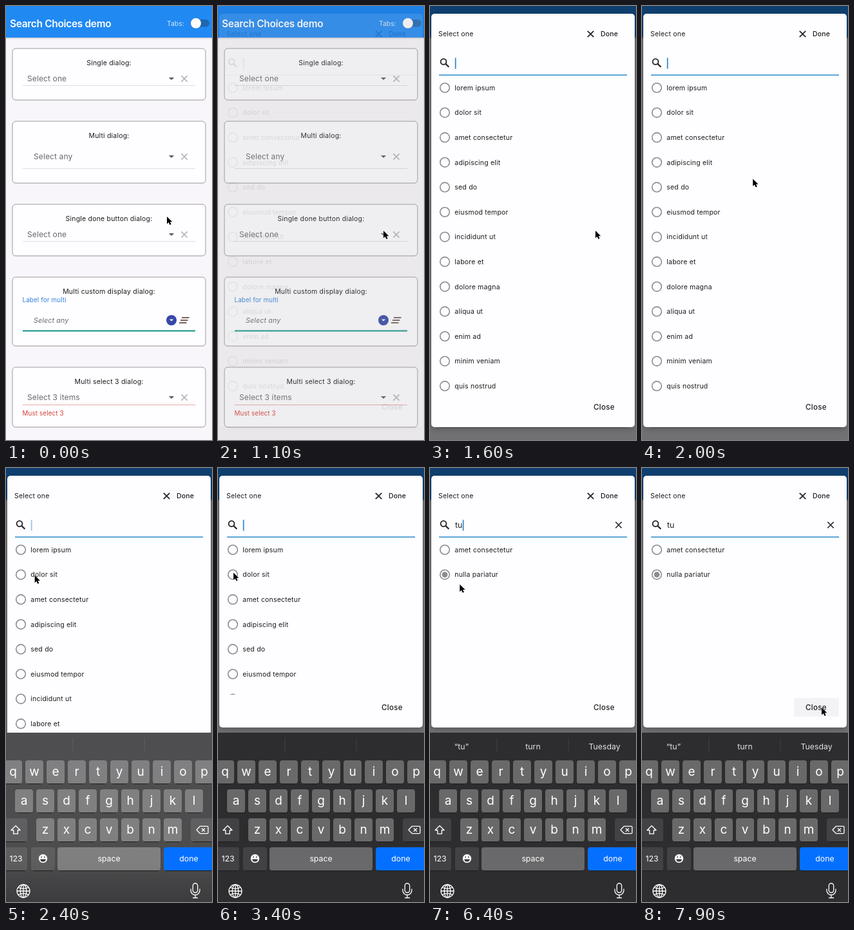
Write an HTML page that moves like this. It is 320 px wide and 674 px high and loops after 8 s.

```html
<!DOCTYPE html>
<html lang="en">
<head>
<meta charset="utf-8">
<title>Search Choices demo</title>
<style>
html, body { margin: 0; width: 100%; height: 100%; overflow: hidden; background: #f8f6fa; }
svg { display: block; width: 320px; height: 674px; font-family: Inter, Roboto, "Liberation Sans", sans-serif; }
text { white-space: pre; }
.body { font-size: 10.5px; letter-spacing: .2px; fill: #1c1c1c; }
.hint { font-size: 12px; letter-spacing: .12px; fill: #69686b; }
.small { font-size: 9.8px; letter-spacing: .15px; }
.mid { text-anchor: middle; }
.key { font-size: 12.3px; fill: #fff; text-anchor: middle; }
.letter { font-size: 19px; fill: #fff; text-anchor: middle; }
.pick { font-size: 12.3px; fill: #e2e2e3; text-anchor: middle; }
</style>
</head>
<body>
<svg id="stage" viewBox="0 0 320 674" xmlns="http://www.w3.org/2000/svg"></svg>
<script>
const LOOP = 8000, STEP = 100, ROWS = 13, PITCH = 38.6;
const OPEN = 1090, READY = 1600, TYPE_T = 4600, TYPE_U = 4900, PICK = 5500;
const STALL = [2100, 2500], BLINK = 1060;
const WORDS = ['lorem ipsum', 'dolor sit', 'amet consectetur', 'adipiscing elit', 'sed do',
  'eiusmod tempor', 'incididunt ut', 'labore et', 'dolore magna', 'aliqua ut', 'enim ad',
  'minim veniam', 'quis nostrud', 'exercitation ullamco', 'laboris nisi', 'ut aliquip', 'ex ea',
  'commodo consequat', 'duis aute', 'irure dolor', 'in reprehenderit', 'in voluptate',
  'velit esse', 'cillum dolore', 'eu fugiat', 'nulla pariatur'];
const PICKED = 'nulla pariatur';

// pointer moves: start, end across, end down, x, y
const MOVES = [[0, 700, 700, 257, 349], [1600, 2580, 2480, 24, 162.5], [6200, 7300, 7300, 279, 372]];
const HOME = [250, 327];

const clamp = v => Math.max(0, Math.min(1, v));
const ramp = (t, a, b) => clamp((t - a) / (b - a));
const smooth = p => p * p * (3 - 2 * p);
const easeOut = p => 1 - (1 - p) ** 3;
const mix = (a, b, p) => a + (b - a) * p;
const range = n => [...Array(n).keys()];

const text = (x, y, s, cls = 'body', more = '') => `<text x="${x}" y="${y}" class="${cls}" ${more}>${s}</text>`;
const rect = (x, y, w, h, fill, r = 0, more = '') =>
  `<rect x="${x}" y="${y}" width="${w}" height="${h}" rx="${r}" fill="${fill}" ${more}/>`;
const line = (x1, y1, x2, y2, color, w = 1) =>
  `<path d="M${x1} ${y1}L${x2} ${y2}" stroke="${color}" stroke-width="${w}" fill="none"/>`;
const cross = (x, y, r, color, w, more = '') =>
  `<path d="M${x - r} ${y - r}l${2 * r} ${2 * r}m0 ${-2 * r}l${-2 * r} ${2 * r}" stroke="${color}" stroke-width="${w}" ${more}/>`;
const caretDown = (x, y, r, color) => `<path d="M${x - r} ${y - r / 2}h${2 * r}l${-r} ${r}z" fill="${color}"/>`;

function card(top, bottom, title, titleY) {
  return rect(10, top + 1, 300, bottom - top, '#000', 5, 'opacity=".06"') +
    rect(10, top, 300, bottom - top, '#fefdff', 5, 'stroke="#9c9b9d"') +
    text(160, titleY + 3.7, title, 'body mid');
}

function field(x, y, hint, lineY, color = '#dddce0') {
  return text(x, y + 4.2, hint, 'hint') + caretDown(257, y, 4.2, '#5c5b5e') +
    cross(277, y, 4.6, '#b5b4b7', 1.6) + line(26, lineY, 294, lineY, color);
}

function page() {
  return rect(0, 0, 320, 674, '#f8f6fa') +
    rect(0, 49, 320, 3, 'url(#barShade)') + rect(0, 0, 320, 49, '#2089f2') +
    text(6, 32.6, 'Search Choices demo', '', 'fill="#fff" font-size="15.4" font-weight="600" letter-spacing="-.28"') +
    text(250, 30.8, 'Tabs:', 'body', 'style="fill:#d6e9fc;font-size:10.3px;letter-spacing:.1px"') +
    rect(288, 21, 28, 11.5, '#1d66b0', 5.7) +
    '<circle cx="295" cy="27.6" r="8" fill="#000" opacity=".15"/><circle cx="295" cy="26.8" r="8" fill="#fcfcfd"/>' +
    card(66, 146, 'Single dialog:', 88) + field(33, 113, 'Select one', 123.5) +
    card(179, 275, 'Multi dialog:', 201.5) + field(43, 234, 'Select any', 252.5) +
    card(308, 388, 'Single done button dialog:', 330) + field(33, 355, 'Select one', 365.5) +
    card(421, 528, 'Multi custom display dialog:', 443.5) +
    text(25.5, 460, 'Label for multi', 'small', 'fill="#3083dc"') +
    text(43, 491.7, 'Select any', 'hint', 'style="font-size:10.7px;font-style:italic"') +
    '<circle cx="257" cy="488" r="8" fill="#3547a8"/>' + caretDown(257, 488, 3.2, '#fff') +
    line(273, 484, 284.5, 484, '#5f4a44', 1.7) + line(271, 488, 282.5, 488, '#5f4a44', 1.7) +
    line(269, 492, 280.5, 492, '#5f4a44', 1.7) + line(26, 504.5, 294, 504.5, '#0e9184', 2) +
    card(561, 654, 'Multi select 3 dialog:', 583.5) + field(33, 608, 'Select 3 items', 619.5, '#e6aaa7') +
    text(25.5, 635.5, 'Must select 3', 'small', 'fill="#d8413a"');
}

function row(i) {
  const y = 127 + PITCH * i;
  return `<g class="row"><circle cx="23" cy="${y}" r="7.3" fill="none" stroke="#8c8b8e" stroke-width="1.6"/>` +
    `<circle class="dot" cx="23" cy="${y}" r="4.4" fill="#8c8b8e"/>` + text(38.3, y + 3.7, '') + '</g>';
}

function dialog() {
  return rect(2, 12, 316, 642, '#fefdff', 5, 'id="sheet" filter="url(#shade)"') +
    text(13, 47.2, 'Select one') + cross(249.5, 43.5, 4.7, '#222', 1.7) +
    text(265, 47.2, 'Done', 'body', 'font-weight="500"') +
    '<circle cx="21" cy="86.5" r="4.4" fill="none" stroke="#222" stroke-width="1.8"/>' +
    line(24.2, 89.7, 29.3, 94.8, '#222', 2.2) +
    text(39, 93, '', '', 'id="query" font-size="12.4" fill="#222"') +
    rect(38.8, 80.5, 1.7, 17, '#2a86c8', 0, 'id="caret"') +
    cross(293, 88.5, 4.7, '#222', 1.6, 'id="clear"') +
    '<path id="rule" d="M14 107.2H306"/>' +
    `<g clip-path="url(#listClip)">${range(ROWS).map(row).join('')}</g>` +
    '<g id="close">' + rect(236, 608, 70, 29, '#f3f2f4', 2, 'id="hover"') +
    text(254, 627, 'Close', '', 'font-size="11.6" font-weight="500" letter-spacing=".3" fill="#222"') + '</g>';
}

function key(x, y, w, fill) {
  return rect(x, y, w, 36, fill, 4) + line(x + 3, y + 36.5, x + w - 3, y + 36.5, '#1b1b1c', 1);
}

function letters(chars, x0, y) {
  return [...chars].map((c, i) => {
    const x = x0 + 33 * i;
    return key(x - 14, y, 28, 'rgba(255,255,255,.286)') + text(x, y + 23.5, c, 'letter');
  }).join('');
}

function keyboard() {
  const dark = 'rgba(255,255,255,.1)', white = 'fill="none" stroke="#fff" stroke-width="1.3"';
  return rect(0, 411, 320, 264, '#2d2d2f') + rect(0, 411, 320, 264, 'url(#glow)', 0, 'id="glow-rect"') +
    line(104, 419, 104, 440, 'rgba(255,255,255,.1)') + line(215, 419, 215, 440, 'rgba(255,255,255,.1)') +
    '<g id="picks">' + text(49, 436.5, '“tu”', 'pick') +
    text(160, 436.5, 'tur<tspan class="late">n</tspan>', 'pick') +
    text(271, 436.5, '<tspan class="late">T</tspan>uesday', 'pick') + '</g>' +
    letters('qwertyuiop', 11, 454) + letters('asdfghjkl', 28, 499) + letters('zxcvbnm', 61, 544) +
    key(-5, 544, 38, dark) + key(287, 544, 38, dark) + key(-5, 589, 38, dark) + key(39, 589, 37, dark) +
    key(80, 589, 160, 'rgba(255,255,255,.286)') + key(245, 589, 80, '#0570ff') +
    text(15.5, 611, '123', 'key') + text(160, 610.5, 'space', 'key') + text(284, 610.5, 'done', 'key') +
    `<path d="M15 555.5l-7 7h3.7v5.7h6.6v-5.7h3.7z" stroke-linejoin="round" ${white}/>` +
    `<path d="M296 562l5.5-5.7h11q1.5 0 1.5 1.5v8.4q0 1.5-1.5 1.5h-11z" stroke-linejoin="round" ${white}/>` +
    cross(306.5, 562, 2.5, '#fff', 1.3) +
    '<circle cx="57.5" cy="606.5" r="6.7" fill="#fff"/>' +
    '<path d="M53.3 607.5h8.4a4.2 4 0 0 1-8.4 0z" fill="#3c3c3e"/>' +
    '<circle cx="55.2" cy="604.3" r="1" fill="#3c3c3e"/><circle cx="59.8" cy="604.3" r="1" fill="#3c3c3e"/>' +
    `<g ${white}><circle cx="27" cy="657" r="10"/><ellipse cx="27" cy="657" rx="4.8" ry="10"/>` +
    '<path d="M27 647v20M17 657h20M19.3 651.3q7.7 4 15.4 0M19.3 662.7q7.7-4 15.4 0"/>' +
    '<rect x="290.3" y="645" width="7.4" height="14.5" rx="3.7"/>' +
    '<path d="M287 653.5v2.5a7 7 0 0 0 14 0v-2.5M294 663v4.5M290 667.5h8"/></g>';
}

const stage = document.getElementById('stage');
stage.innerHTML = `<defs>
  <linearGradient id="barShade" x2="0" y2="1"><stop stop-color="#000" stop-opacity=".18"/><stop offset="1" stop-color="#000" stop-opacity="0"/></linearGradient>
  <linearGradient id="glow" x2="0" y2="1"><stop stop-color="#fff" stop-opacity=".16"/><stop offset=".75" stop-color="#fff" stop-opacity=".15"/><stop offset="1" stop-color="#fff" stop-opacity=".07"/></linearGradient>
  <filter id="shade" x="-10%" y="-10%" width="120%" height="120%"><feDropShadow dx="0" dy="3" stdDeviation="5" flood-opacity=".22"/></filter>
  <clipPath id="listClip"><rect id="clip" x="2" y="112" width="316" height="491"/></clipPath></defs>
  ${page()}${rect(0, 0, 320, 674, '#000', 0, 'id="scrim"')}
  <g id="dialog">${dialog()}</g><g id="keyboard">${keyboard()}</g>
  <path id="pointer" d="M0 0V11.4L2.6 9L4.5 13L6.6 12.1L4.8 8.2H8.3Z" fill="#000" stroke="#fff" stroke-width=".9" stroke-linejoin="round" paint-order="stroke"/>`;

const el = id => document.getElementById(id);
const set = (node, attrs) => { for (const k in attrs) node.setAttribute(k, attrs[k]); };
const show = (node, on) => node.setAttribute('visibility', on ? 'inherit' : 'hidden');
const rows = [...stage.querySelectorAll('.row')];
const late = [...stage.querySelectorAll('.late')];

function pointerAt(t) {
  return MOVES.reduce(([px, py], [start, endX, endY, x, y]) => [
    mix(px, x, smooth(ramp(t, start, endX))),
    mix(py, y, smooth(ramp(t, start, endY)))
  ], HOME);
}

// The blink pauses while the app lays itself out for the keyboard.
function caretAlpha(t) {
  const [from, to] = STALL;
  const clock = t < from ? t - READY : Math.max(from, t - to + from) - READY;
  const age = t < TYPE_T ? clock : t - (t < TYPE_U ? TYPE_T : TYPE_U);
  if (age < 0) return 1;
  const p = (age / BLINK) % 1;
  return p < .6 ? 1 - ramp(p, .41, .53) : ramp(p, .9, 1);
}

function draw(t) {
  // The opening fade hangs just short of its end until the list is ready.
  const fade = t < READY ? Math.min(.88, 1 - (1 - ramp(t, OPEN, OPEN + 150)) ** 1.6) : 1;
  const shrink = easeOut(ramp(t, 2450, 2600));
  const bottom = mix(654, 403, shrink);
  const query = t < TYPE_T ? '' : t < TYPE_U ? 't' : 'tu';
  const [px, py] = pointerAt(t);

  set(el('scrim'), { opacity: .54 * Math.min(1, fade / .88) });
  set(el('dialog'), { opacity: fade });
  set(el('sheet'), { height: bottom - 12 });
  set(el('clip'), { height: bottom - 51 - 112 });
  set(el('close'), { transform: `translate(0 ${bottom - 654})` });
  show(el('hover'), fade === 1 && px > 236 && px < 306 && py > bottom - 46 && py < bottom - 17);
  set(el('rule'), t < READY ? { stroke: '#858487', 'stroke-width': 1 } : { stroke: '#2a8bcb', 'stroke-width': 1.6 });

  el('query').textContent = query;
  show(el('clear'), query);
  set(el('caret'), { x: 38.8 + [0, 4.7, 12][query.length], opacity: caretAlpha(t) });

  const found = WORDS.filter(w => w.includes(query));
  rows.forEach((r, i) => {
    show(r, i < found.length);
    r.querySelector('text').textContent = found[i] || '';
    show(r.querySelector('.dot'), found[i] === PICKED && t >= PICK);
  });

  set(el('keyboard'), { transform: `translate(0 ${264 * (1 - easeOut(ramp(t, 2050, 2400)))})` });
  set(el('glow-rect'), { opacity: 1 - shrink });
  set(el('picks'), { opacity: ramp(t, TYPE_U - 50, TYPE_U + 100) });
  late.forEach(s => set(s, { 'fill-opacity': mix(.2, 1, ramp(t, TYPE_U, TYPE_U + 200)) }));
  set(el('pointer'), { transform: `translate(${px} ${py})` });
}

const began = performance.now();
function tick() {
  const t = (performance.now() - began) % LOOP;
  draw(Math.floor(t / STEP) * STEP);
  requestAnimationFrame(tick);
}
tick();
</script>
</body>
</html>
```
